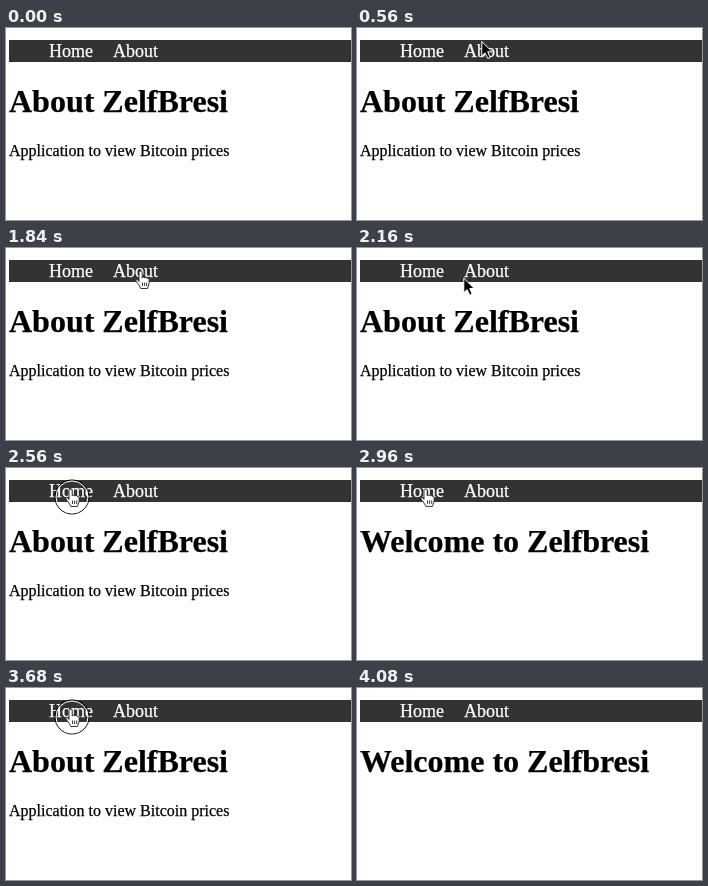
An HTML page for the animation above (4720 ms loop, 345 by 192 pixels).

```html
<!DOCTYPE html>
<html lang="en">
<head>
<meta charset="utf-8">
<title>Price viewer navigation</title>
<style>
  html, body { margin: 0; height: 100%; overflow: hidden; background: #fff; }
  svg { display: block; width: 345px; height: 192px; }
  text { font: 16px "Liberation Serif", Times, serif; stroke: #000; stroke-width: .25px; }
  .link { font-size: 18px; fill: #fff; stroke: #fff; }
  .title { font-size: 32px; font-weight: bold; }
</style>
</head>
<body>
<svg viewBox="0 0 345 192">
  <rect x="3" y="12" width="342" height="22" fill="#333"/>
  <text class="link" x="43" y="29">Home</text>
  <text class="link" x="107" y="29">About</text>
  <g id="aboutPage">
    <text class="title" x="3" y="84">About ZelfBresi</text>
    <text x="3" y="128">Application to view Bitcoin prices</text>
  </g>
  <text id="homePage" class="title" x="3" y="84">Welcome to Zelfbresi</text>
  <g id="cursor">
    <path id="arrow" stroke="#fff" d="M0 0V14.5L3.3 11.4L6 17L8.4 16L5.9 10.3H10.4Z"/>
    <g id="hand" fill="#fff" stroke="#222" stroke-width=".9" stroke-linejoin="round">
      <path d="M-3 2.5V-6.3a1.6 1.6 0 0 1 3.2 0V-1a1.4 1.4 0 0 1 2.6 0a1.3 1.3 0 0 1 2.4 .6a1.1 1.1 0 0 1 1.9 .8V4.5L5.5 9.5H-1.2C-2.5 6-5 4-6 1.8C-6.5 .2-4.5-.2-3 2.5Z"/>
      <path d="M.5 3.5v3.5m2.1-3.5v3.5m2.1-3.5v3.5"/>
    </g>
    <g id="ring" fill="none">
      <circle r="17" stroke="#000"/>
      <circle r="16" stroke="#fff"/>
    </g>
  </g>
</svg>
<script>
const LOOP = 4720, STEP = 80;
const RING_TIME = 240, LOAD_TIME = 160;

const home = { x: 66, y: 29 }, about = { x: 138, y: 27 };
const entry = { x: 166, y: 104 }, bend = { x: 93, y: -25 };
const rest = { x: 136, y: 31 }, exit = { x: 98, y: 177 };

// A move that opens a page ends in a click.
const moves = [
  { start: 160, end: 720, to: about, via: bend, opens: "about" },
  { start: 1040, end: 1280, to: rest },
  { start: 1840, end: 2560, to: home, opens: "home" },
  { start: 2920, end: 3200, to: about, opens: "about" },
  { start: 3360, end: 3680, to: home, opens: "home" },
  { start: 3840, end: 4080, to: exit }
];

const $ = id => document.getElementById(id);
const show = (id, on) => { $(id).style.display = on ? "" : "none"; };
const ease = k => k * k * (3 - 2 * k);
const mix = (a, b, k) => ({ x: a.x + (b.x - a.x) * k, y: a.y + (b.y - a.y) * k });

function pointerAt(t) {
  let pos = entry;
  for (const { start, end, to, via } of moves) {
    if (t < start) break;
    const k = ease(Math.min(1, (t - start) / (end - start)));
    const straight = mix(pos, to, k);
    pos = via ? mix(mix(pos, via, k), mix(via, to, k), k) : straight;
  }
  return pos;
}

function overLink({ x, y }) {
  const onHome = x >= 43 && x < 87, onAbout = x >= 107 && x < 152;
  return y >= 15 && y < 34 && (onHome || onAbout);
}

function draw(now) {
  const t = Math.floor(now % LOOP / STEP) * STEP;
  const clicks = moves.filter(move => move.opens);

  const page = clicks.reduce(
    (current, { end, opens }) => t >= end + LOAD_TIME ? opens : current, "about");
  show("homePage", page === "home");
  show("aboutPage", page === "about");

  const pos = pointerAt(t), hover = overLink(pos);
  $("cursor").setAttribute("transform", `translate(${pos.x} ${pos.y})`);
  show("cursor", t >= moves[0].start && t < moves.at(-1).end);
  show("hand", hover);
  show("arrow", !hover);
  show("ring", clicks.some(({ end }) => t >= end && t < end + RING_TIME));
}

const begun = performance.now();
function tick() {
  draw(performance.now() - begun);
  requestAnimationFrame(tick);
}
tick();
</script>
</body>
</html>
```
